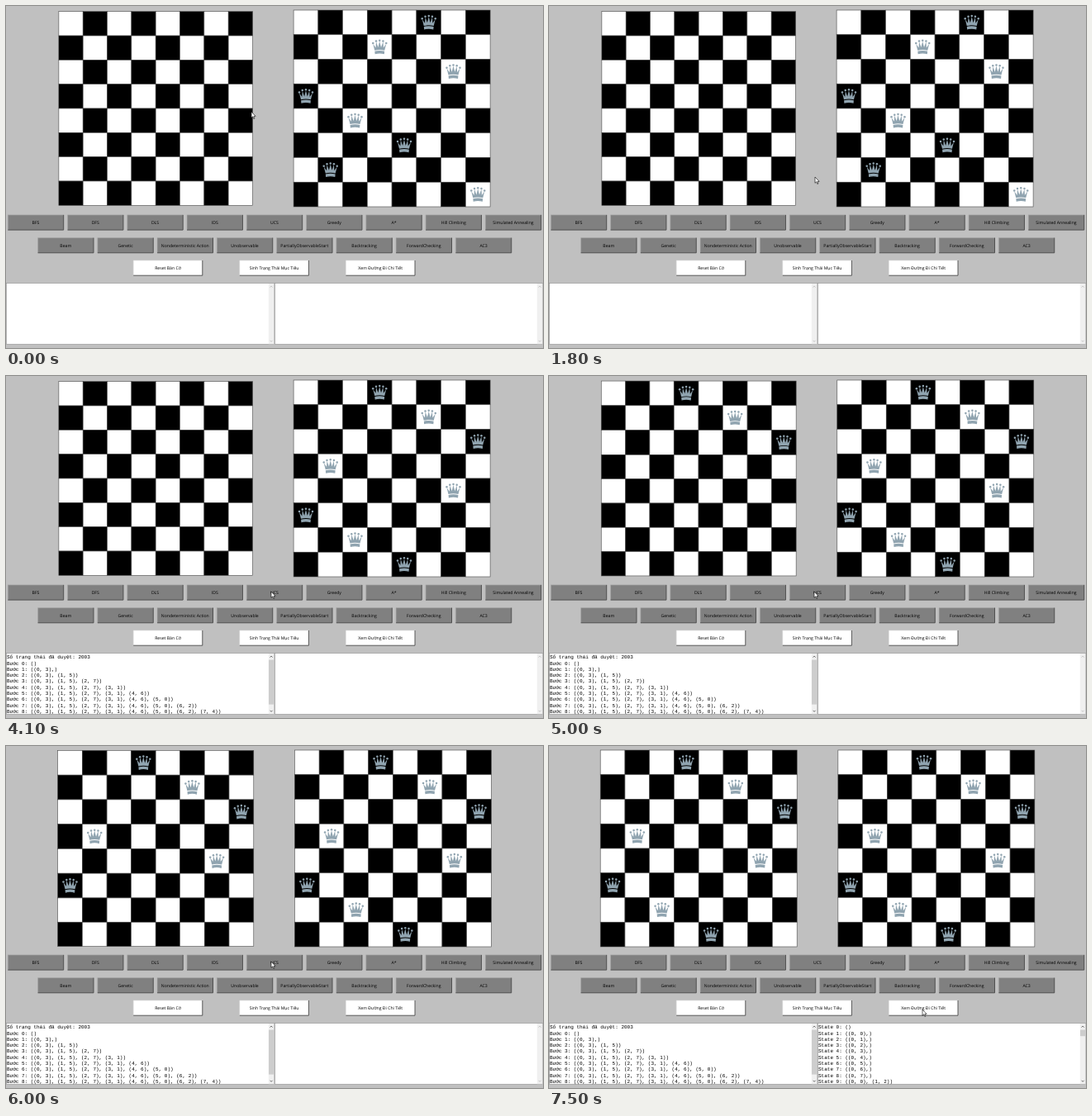
An HTML page that plays this animation: 650x414 px, repeating every 8 s.

```html
<!DOCTYPE html>
<html lang="vi">
<head>
<meta charset="utf-8">
<title>8 Queens</title>
<style>
  html, body { margin: 0; width: 100%; height: 100%; overflow: hidden; background: #c0c0c0; }
  svg { display: block; width: 650px; height: 414px; }
  text { text-rendering: geometricPrecision; white-space: pre; }
  .label { font: 5.15px "Open Sans", "Noto Sans", sans-serif; text-anchor: middle; }
  .mono { font: 6px "Liberation Mono", "Courier New", monospace; }
  .cell { stroke: #4a4a4a; stroke-width: .6; }
  .queen { fill: #90a4b0; }
</style>
</head>
<body>
<svg id="stage" viewBox="0 0 650 414">
  <defs>
    <g id="queen">
      <path d="M-8-4L-4.7 .8L-4.2-6.5L-1.8 .3L0-7L1.8 .3L4.2-6.5L4.7 .8L8-4L6 4.2Q0 2.7-6 4.2Z"/>
      <path d="M-5.9 5.1Q0 3.6 5.9 5.1L5.6 8.6Q0 6.9-5.6 8.6Z"/>
      <circle cx="-8" cy="-4.6" r="1.25"/><circle cx="-4.2" cy="-7.1" r="1.25"/>
      <circle cy="-7.8" r="1.25"/>
      <circle cx="4.2" cy="-7.1" r="1.25"/><circle cx="8" cy="-4.6" r="1.25"/>
    </g>
  </defs>
</svg>
<script>
const LOOP = 8000, TICK = 100;
const SWAP = 2600, LOG = 4000, FIRST = 4300, STEP = 300, STATES = 7400;
const CELL = 29.33, GROWN = 29.75;
const oldGoal = [5, 3, 6, 0, 2, 4, 1, 7];
const goal = [3, 5, 7, 1, 6, 0, 2, 4];
const stage = document.getElementById('stage');

function add(parent, tag, attrs, text) {
  const el = document.createElementNS('http://www.w3.org/2000/svg', tag);
  set(el, attrs);
  if (text) el.textContent = text;
  parent.appendChild(el);
  return el;
}
function set(el, attrs) {
  for (const k in attrs) el.setAttribute(k, attrs[k]);
}
function show(el, on) {
  el.setAttribute('visibility', on ? 'visible' : 'hidden');
}

// Boards: a row or column holding a queen is slightly larger
function makeBoard() {
  const g = add(stage, 'g', {});
  const cells = [], queens = [];
  for (let i = 0; i < 64; i++) {
    const dark = ((i >> 3) + i) % 2;
    cells.push(add(g, 'rect', { class: 'cell', fill: dark ? '#000' : '#fff' }));
  }
  for (let r = 0; r < 8; r++) queens.push(add(g, 'use', { href: '#queen', class: 'queen' }));
  return { cells, queens };
}
function edges(sizes, mid) {
  const list = [mid - sizes.reduce((a, b) => a + b) / 2];
  sizes.forEach(s => list.push(list[list.length - 1] + s));
  return list;
}
function layout(board, cx, cy, cols, count) {
  const wide = Array(8).fill(CELL), tall = Array(8).fill(CELL);
  for (let r = 0; r < count; r++) tall[r] = wide[cols[r]] = GROWN;
  const xs = edges(wide, cx), ys = edges(tall, cy);
  board.cells.forEach((cell, i) => {
    const r = i >> 3, c = i & 7;
    set(cell, { x: xs[c], y: ys[r], width: wide[c], height: tall[r] });
  });
  board.queens.forEach((q, r) => {
    const c = cols[r];
    set(q, { x: xs[c] + wide[c] / 2, y: ys[r] + tall[r] / 2 });
    show(q, r < count);
  });
}

// Buttons
function buttonRow(names, x, y, pitch, w, fill, light) {
  names.forEach((name, i) => {
    const l = x + i * pitch, h = 18.2, r = l + w, b = y + h;
    add(stage, 'rect', { x: l, y, width: w, height: h, fill });
    add(stage, 'path', { d: `M${l} ${b}V${y}H${r}`, fill: 'none', stroke: light, 'stroke-width': .6 });
    add(stage, 'path', { d: `M${l} ${b}H${r}V${y}`, fill: 'none', stroke: '#484848', 'stroke-width': .9 });
    add(stage, 'text', { class: 'label', x: l + w / 2, y: y + 11 }, name);
  });
}

// Text panels with scrollbars
function makePanel(x, lines, thumb) {
  add(stage, 'rect', { x: x + .4, y: 335.6, width: 324.2, height: 74, fill: '#fff', stroke: '#999', 'stroke-width': .7 });
  add(stage, 'rect', { x: x + 317.8, y: 336, width: 6.6, height: 73.2, fill: '#f0f0f0' });
  const sx = x + 321.1;
  const arrows = add(stage, 'path', {
    d: `M${sx - 1.5} 340.6l1.5-1.6l1.5 1.6M${sx - 1.5} 404.8l1.5 1.6l1.5-1.6`,
    fill: 'none', 'stroke-width': .8
  });
  const g = add(stage, 'g', {});
  add(g, 'rect', { x: x + 318, y: 343.6, width: 6.2, height: thumb, fill: '#cdcdcd' });
  lines.forEach((line, i) => add(g, 'text', { class: 'mono', x: x + 1, y: 342.2 + i * 7.3 }, line));
  return on => {
    show(g, on);
    arrows.setAttribute('stroke', on ? '#505050' : '#bbb');
  };
}
function tuple(cols) {
  const pairs = cols.map((c, r) => `(${r}, ${c})`);
  return `(${pairs.join(', ')}${pairs.length === 1 ? ',' : ''})`;
}

const left = makeBoard(), right = makeBoard();
buttonRow(['BFS', 'DFS', 'DLS', 'IDS', 'UCS', 'Greedy', 'A*', 'Hill Climbing', 'Simulated Annealing'],
  2.3, 252.9, 72.25, 67.4, '#808080', '#a8a8a8');
buttonRow(['Beam', 'Genetic', 'Nondeterministic Action', 'Unobservable', 'PartiallyObservableStart',
  'Backtracking', 'ForwardChecking', 'AC3'], 38.6, 280.6, 72.25, 67.4, '#808080', '#a8a8a8');
buttonRow(['Reset Bàn Cờ', 'Sinh Trạng Thái Mục Tiêu', 'Xem Đường Đi Chi Tiết'],
  154.2, 308, 128.6, 83.6, '#fff', '#ddd');

const steps = [...Array(9).keys()].map(n => `Bước ${n}: ${tuple(goal.slice(0, n))}`);
const tried = [[], ...[...Array(8).keys()].map(c => [c]), [0, 2]];
const showLog = makePanel(0, ['Số trạng thái đã duyệt: 2003', ...steps], 54);
const showStates = makePanel(325, tried.map((s, n) => `State ${n}: ${tuple(s)}`), 7.6);

const cursor = add(stage, 'path', {
  d: 'M0 0V7.3L1.7 5.8L2.9 8.5L4 8L2.9 5.4H5.1Z',
  fill: '#fff', stroke: '#000', 'stroke-width': .6
});
const path = [
  [0, 297, 128], [200, 297, 128], [500, 312, 124], [900, 345, 151], [1000, 345, 151],
  [1300, 327, 161], [1400, 327, 161], [1800, 322, 207], [2300, 328, 294], [2500, 330, 315],
  [2700, 330, 315], [3200, 318, 220], [3400, 318, 220], [3800, 321, 261],
  [6700, 321, 261], [7100, 452, 319], [LOOP, 452, 319]
];
function cursorAt(t) {
  const i = path.findIndex(p => p[0] > t);
  const [t0, x0, y0] = path[i - 1], [t1, x1, y1] = path[i];
  const u = (t - t0) / (t1 - t0), e = u * u * (3 - 2 * u);
  return [x0 + (x1 - x0) * e, y0 + (y1 - y0) * e];
}

let last = -1;
function draw(now) {
  const t = Math.floor((now % LOOP) / TICK) * TICK;
  if (t !== last) {
    last = t;
    const placed = Math.max(0, Math.min(8, Math.floor((t - FIRST) / STEP) + 1));
    layout(left, 181.2, 124, goal, placed);
    layout(right, 467.1 + placed * .22, 124, t < SWAP ? oldGoal : goal, 8);
    showLog(t >= LOG);
    showStates(t >= STATES);
    cursor.setAttribute('transform', `translate(${cursorAt(t)})`);
  }
}
function frame() {
  draw(performance.now());
  requestAnimationFrame(frame);
}
frame();
</script>
</body>
</html>
```
